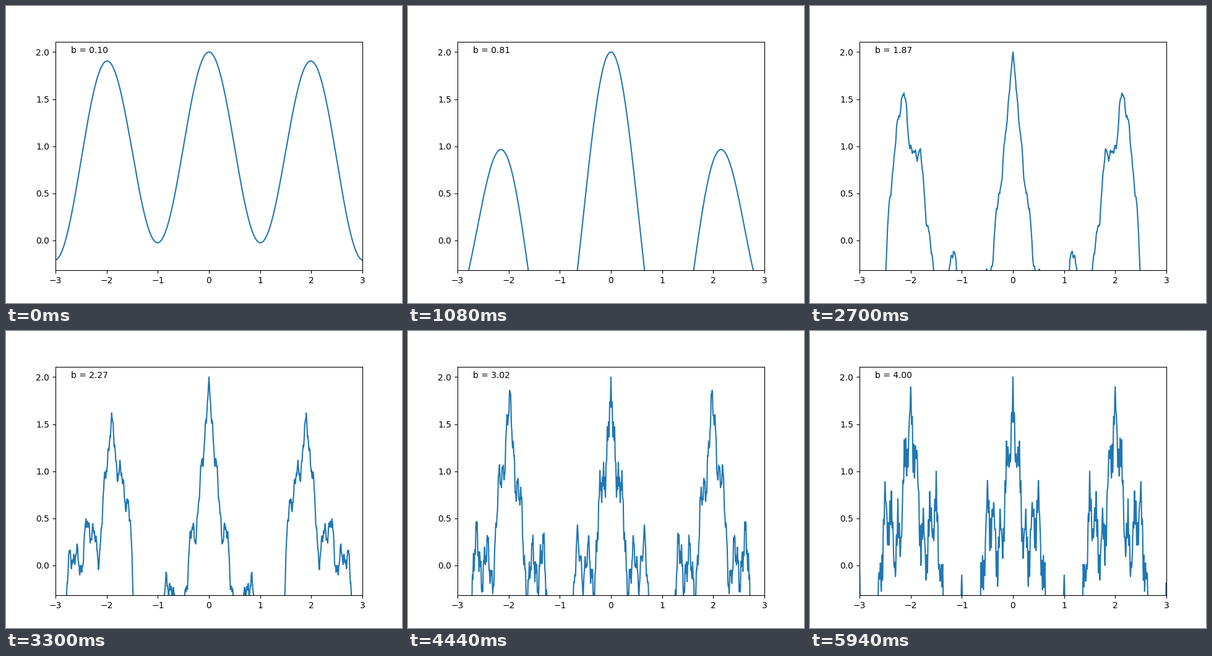
Animation, 640 px wide and 480 px high, one loop 6000 ms. Source, as a matplotlib script:

```python
import numpy as np
import matplotlib.pyplot as plt
from matplotlib.animation import FuncAnimation

FRAMES = 100
INTERVAL = 60
A = 0.5
TERMS = 25

x = np.linspace(-3, 3, 1000, endpoint=False)
b_values = np.linspace(0.1, 4.0, FRAMES)


def weierstrass(x, b):
    return sum(A**n * np.cos(b**n * np.pi * x) for n in range(TERMS))


fig, ax = plt.subplots(figsize=(6.4, 4.8), dpi=100)
line, = ax.plot(x, weierstrass(x, b_values[0]))
label = ax.text(0.05, 0.95, "", transform=ax.transAxes)

# Keep the limits fitted to the first, smooth curve.
ax.set_xlim(-3, 3)
ax.set_ylim(ax.get_ylim())


def update(i):
    b = b_values[i]
    line.set_ydata(weierstrass(x, b))
    label.set_text(f"b = {b:.2f}")
    return line, label


anim = FuncAnimation(fig, update, frames=FRAMES, interval=INTERVAL,
                     repeat=True, repeat_delay=0)
plt.show()
```
